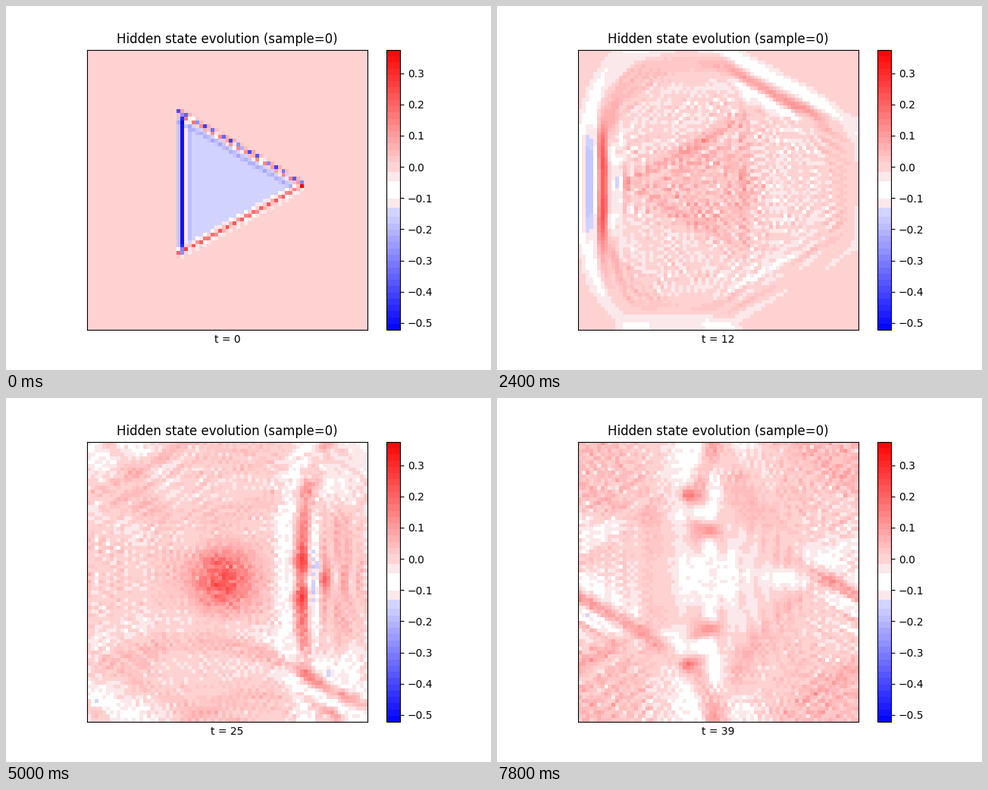
Recreate the animation shown at these times as a matplotlib script. Size 640x480 px, loop 8000 ms.

```python
import numpy as np
import matplotlib.pyplot as plt
from matplotlib.animation import FuncAnimation
from matplotlib.colors import ListedColormap

N = 75                 # cells per side
STEPS = 40
SUB = 4                # solver substeps per shown step
SPEED = 1.9            # cells per shown step
VMIN, VMAX = -0.5227, 0.3753
CENTER = (35.6, 36.5)
TRIANGLE = [(25, 18), (57, 36), (25, 55)]
EDGE_GAIN = np.array([0.6, 0.25, 1.05])    # upper, lower, left

rng = np.random.default_rng(4)
y, x = np.mgrid[:N, :N].astype(float)
grain = rng.normal(size=(N, N))


def bump(d, width):
    return np.exp(-(d / width) ** 2)


def spot(cx, cy, radius):
    return bump(np.hypot(x - cx, y - cy), radius)


def banded_bwr(n=1024):
    """Blue-white-red map in flat bands with a wide white middle."""
    first, bands = 0.195, 18
    width = (1 - first) / bands
    colors = []
    for pos in (np.arange(n) + 0.5) / n:
        d = abs(pos - 0.5) * 2
        if d < 0.0625:
            colors.append((1, 1, 1))
        elif d < 0.127:
            colors.append((0.985, 0.91, 0.92))
        else:
            step = max(np.floor((d - first) / width), -1)
            fade = 1 - first - width * (step + 0.5)
            colors.append((1, fade, fade) if pos > 0.5 else (fade, fade, 1))
    return ListedColormap(colors)


def triangle_distance():
    """Signed distance to the triangle and the index of the nearest edge."""
    dists = []
    inside = np.ones((N, N), bool)
    for (px, py), (qx, qy) in zip(TRIANGLE, TRIANGLE[1:] + TRIANGLE[:1]):
        ex, ey = qx - px, qy - py
        k = np.clip(((x - px) * ex + (y - py) * ey) / (ex**2 + ey**2), 0, 1)
        dists.append(np.hypot(x - px - k * ex, y - py - k * ey))
        inside &= ex * (y - py) - ey * (x - px) >= 0
    near = np.min(dists, axis=0)
    return np.where(inside, -near, near), np.argmin(dists, axis=0)


def first_state():
    """Filled triangle; sampling the edge ripples per cell makes the dots."""
    top = y - 19 - (x - 28) * 0.58
    low = 55 - (x - 24) * 0.545 - y
    span = (x >= 24) & (x <= 57)
    body = span & (top > -1) & (low > 0)
    upper = (0.08 * bump(top + 1.25, 0.3) - 0.3 * bump(top + 0.75, 0.25)
             + 0.3 * bump(top, 0.5) - 0.07 * bump(top - 2, 0.5))
    lower = (0.38 * bump(low - 0.9, 0.6) + 0.1 * bump(low - 2, 0.5)
             - 0.03 * bump(low + 0.5, 0.5))
    left = -0.3 * bump(x - 25, 0.6) - 0.06 * np.cos(np.pi * x) * -bump(x - 26, 1.5)
    return (body * (left - 0.155) + upper * (span & (low > 0))
            + lower * (span & (top > -1)))


def profile(s):
    """Outgoing front: pale crest ahead, red ridge, pale trough behind."""
    return (-0.15 * bump(s - 0.5, 1.5) + 0.24 * bump(s + 3.3, 1.5)
            - 0.08 * bump(s + 7, 1.4))


def simulate(start):
    """Wave equation on a torus, started with fronts that run outward."""
    s, edge = triangle_distance()
    c = SPEED / SUB
    gain = EDGE_GAIN[edge]
    still = 0.6 * np.clip(start, -0.17, 0.3) + 0.1 * grain * bump(s, 1.2)
    u = gain * profile(s) + still
    prev = gain * profile(s + c) + still
    u, prev = u - u.mean(), prev - prev.mean()
    sponge = 1 - 0.1 * spot(*CENTER, 10)
    states = [u]
    for t in range(1, STEPS):
        for _ in range(SUB):
            lap = sum(np.roll(u, d, a) for d in (1, -1) for a in (0, 1)) - 4 * u
            u, prev = 2 * u - prev + c * c * lap, u
            if t > 22:
                u, prev = u * sponge, prev * sponge
        states.append(u)
    return states


def core_pulse(t):
    rise = np.clip((t - 9) / 6, 0, 1)
    swing = 0.06 + 0.16 * np.cos(2 * np.pi * (t - 34) / 9.3)
    return rise * swing * spot(*CENTER, 8.5) * (1 + 0.2 * grain)


def split_front(t):
    """Red, blue, red crests that part above and below the core."""
    rise = np.clip((t - 23) / 4, 0, 1)
    k = t - 29
    z = np.zeros((N, N))
    for j in range(3):
        cx = 47.8 + 3 * j - 1.9 * k
        gap = max(10.2 - 4.8 * j + 1.25 * k, 0.5)
        for side in (-1, 1):
            z += 0.18 * (-1) ** j * spot(cx, CENTER[1] + side * gap, 2.1)
    return rise * z


start = first_state()
waves = simulate(start)


def field(t):
    keep = np.exp(-(t / 1.6) ** 2)
    live = waves[t] + core_pulse(t) + split_front(t)
    return keep * start + (1 - keep) * live


fig, ax = plt.subplots(figsize=(6.4, 4.8), dpi=100)
image = ax.imshow(field(0), cmap=banded_bwr(), vmin=VMIN, vmax=VMAX,
                  interpolation="nearest")
fig.colorbar(image, ax=ax)
ax.set_xticks([])
ax.set_yticks([])
ax.set_title("Hidden state evolution (sample=0)")
label = ax.set_xlabel("t = 0")


def update(t):
    image.set_data(field(t))
    label.set_text(f"t = {t}")
    return image, label


anim = FuncAnimation(fig, update, frames=STEPS, interval=200,
                     repeat=True, repeat_delay=0, blit=False)
plt.show()
```
